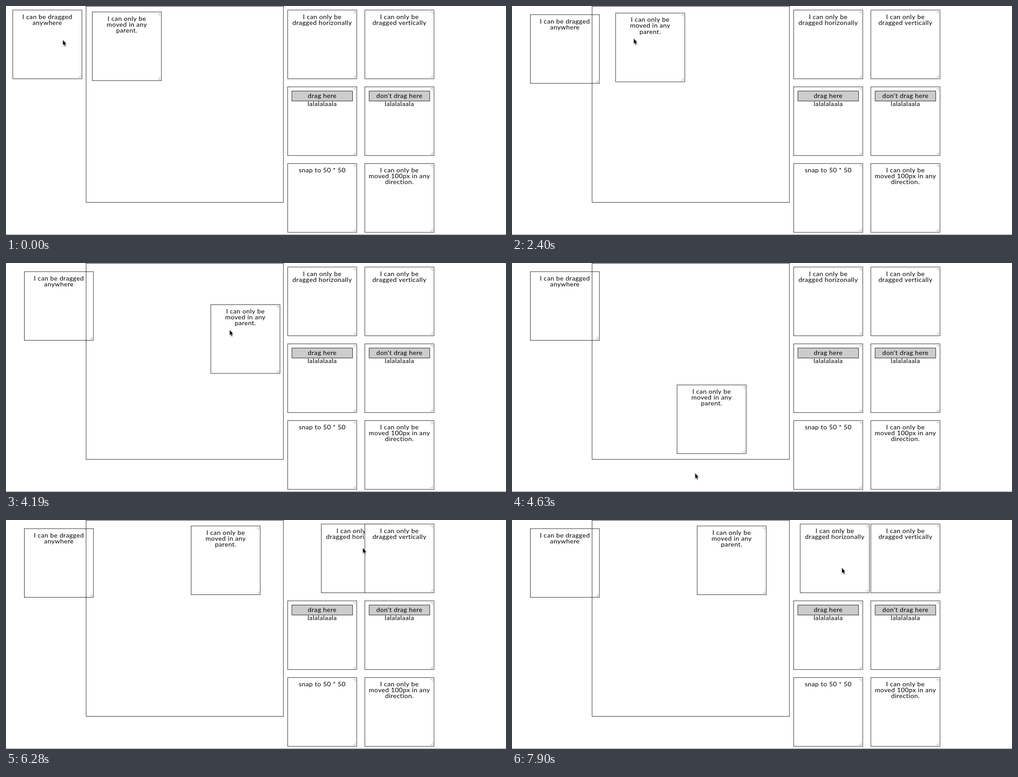
Recreate the animation shown at these times as an HTML page with a canvas. Size 1103x508 px, loop 8 s.

```html
<!DOCTYPE html>
<html lang="en">
<head>
<meta charset="utf-8">
<title>Draggable boxes</title>
<style>
  html, body { margin: 0; width: 100%; height: 100%; overflow: hidden; background: #fff; }
  canvas { display: block; }
</style>
</head>
<body>
<canvas id="stage" width="1103" height="508"></canvas>
<script>
const ctx = document.getElementById('stage').getContext('2d');
const LOOP = 8000;
const TICK = 149;
const SCALE = 1103 / 1295; // the page is shown slightly reduced
const SIZE = 180;
const PITCH = 200;
const COL = 729;
const ROW = 10;

// Turning points of the pointer, in page units.
const turns = [
  { at: 0, x: 147, y: 89 },
  { at: 1, x: 135, y: 91 },
  { at: 3, x: 118, y: 84 },
  { at: 6, x: 230, y: 116 },
  { at: 8, x: 213, y: 127 },
  { at: 11, x: 165, y: 103 },
  { at: 13, x: 373, y: 88 },
  { at: 15, x: 270, y: 82 },
  { at: 20, x: 743, y: 115 },
  { at: 22, x: 626, y: 123 },
  { at: 25, x: 150, y: 320 },
  { at: 28, x: 579, y: 175 },
  { at: 31, x: 474, y: 548 },
  { at: 33, x: 526, y: 60 },
  { at: 36, x: 943, y: 28 },
  { at: 39, x: 837, y: 70 },
  { at: 44, x: 970, y: 75 },
  { at: 46, x: 821, y: 64 },
  { at: 49, x: 883, y: 0 },
  { at: 53, x: 854, y: 125 }
];

// Each box follows the pointer between two ticks, within its limits.
const anywhere = { x: 17, y: 10, from: 1, to: 11, minX: 0, maxX: 1295, minY: 0, maxY: 596 };
const parented = { x: 223, y: 15, from: 15, to: 33, minX: 223, maxX: 530, minY: 15, maxY: 317 };
const horizontal = { x: COL, y: ROW, from: 39, to: 53, minX: 0, maxX: 1295, minY: ROW, maxY: ROW };

const clamp = (v, min, max) => Math.max(min, Math.min(max, v));
const ease = k => (1 - Math.cos(Math.PI * k)) / 2;

function pointerAt(tick) {
  const next = turns.findIndex(turn => turn.at > tick);
  if (next < 0) return turns[turns.length - 1];
  const a = turns[next - 1];
  const b = turns[next];
  const k = ease((tick - a.at) / (b.at - a.at));
  return {
    x: Math.round(a.x + (b.x - a.x) * k),
    y: Math.round(a.y + (b.y - a.y) * k)
  };
}

function dragged(item, tick) {
  const grab = pointerAt(item.from);
  const now = pointerAt(clamp(tick, item.from, item.to));
  return {
    x: clamp(item.x + now.x - grab.x, item.minX, item.maxX),
    y: clamp(item.y + now.y - grab.y, item.minY, item.maxY)
  };
}

const cell = (col, row) => ({ x: COL + col * PITCH, y: ROW + row * PITCH });

function outline(x, y, w, h, fill) {
  if (fill) {
    ctx.fillStyle = fill;
    ctx.fillRect(x, y, w, h);
  }
  ctx.strokeStyle = '#000';
  ctx.lineWidth = 1;
  ctx.strokeRect(x + 0.5, y + 0.5, w - 1, h - 1);
}

function handle(x, y, dir) {
  ctx.fillStyle = '#999';
  ctx.fillRect(x - 5, y, 6, 1);
  ctx.fillRect(x, dir > 0 ? y : y - 5, 1, 6);
}

function label(text, x, y) {
  ctx.fillStyle = '#000';
  ctx.fillText(text, x, y);
}

function box({ x, y }, lines, topHandle = true) {
  outline(x, y, SIZE, SIZE, '#fff');
  lines.forEach((line, i) => label(line, x + SIZE / 2, y + 23.5 + i * 15.4));
  if (topHandle) handle(x + 175, y + 5, 1);
  handle(x + 175, y + 175, -1);
}

function barBox({ x, y }, title) {
  box({ x, y }, []);
  label('lalalalaala', x + SIZE / 2, y + 50.5);
  outline(x + 11, y + 11, 158, 27, '#ccc');
  label(title, x + SIZE / 2, y + 30);
}

function pointer({ x, y }) {
  ctx.save();
  ctx.translate(x, y);
  ctx.scale(1 / SCALE, 1 / SCALE);
  ctx.beginPath();
  [[0.5, 0], [0.5, 11], [2.8, 8.8], [4.6, 13], [6.3, 12.2], [4.6, 8.2], [7.7, 8]]
    .forEach(([px, py]) => ctx.lineTo(px, py));
  ctx.closePath();
  ctx.shadowColor = 'rgba(0,0,0,0.4)';
  ctx.shadowBlur = 2;
  ctx.shadowOffsetY = 1;
  ctx.strokeStyle = '#fff';
  ctx.lineWidth = 1.6;
  ctx.stroke();
  ctx.shadowColor = 'transparent';
  ctx.fillStyle = '#000';
  ctx.fill();
  ctx.restore();
}

function draw(tick) {
  ctx.setTransform(SCALE, 0, 0, SCALE, 0, 0);
  ctx.fillStyle = '#fff';
  ctx.fillRect(0, 0, 1295, 597);
  ctx.font = '16.8px Lato, "Open Sans", sans-serif';
  ctx.letterSpacing = '0.55px';
  ctx.textAlign = 'center';

  box(dragged(anywhere, tick), ['I can be dragged', 'anywhere'], false);
  outline(207, 0, 512, 512);
  box(dragged(parented, tick), ['I can only be', 'moved in any', 'parent.']);
  box(dragged(horizontal, tick), ['I can only be', 'dragged horizonally']);
  box(cell(1, 0), ['I can only be', 'dragged vertically']);
  barBox(cell(0, 1), 'drag here');
  barBox(cell(1, 1), "don't drag here");
  box(cell(0, 2), ['snap to 50 * 50']);
  box(cell(1, 2), ['I can only be', 'moved 100px in any', 'direction.']);

  ctx.fillStyle = '#666';
  ctx.fillRect(0, 595, 1295, 1);
  pointer(pointerAt(tick));
}

const start = performance.now();
function loop() {
  draw(Math.floor(((performance.now() - start) % LOOP) / TICK));
  requestAnimationFrame(loop);
}
loop();
</script>
</body>
</html>
```
